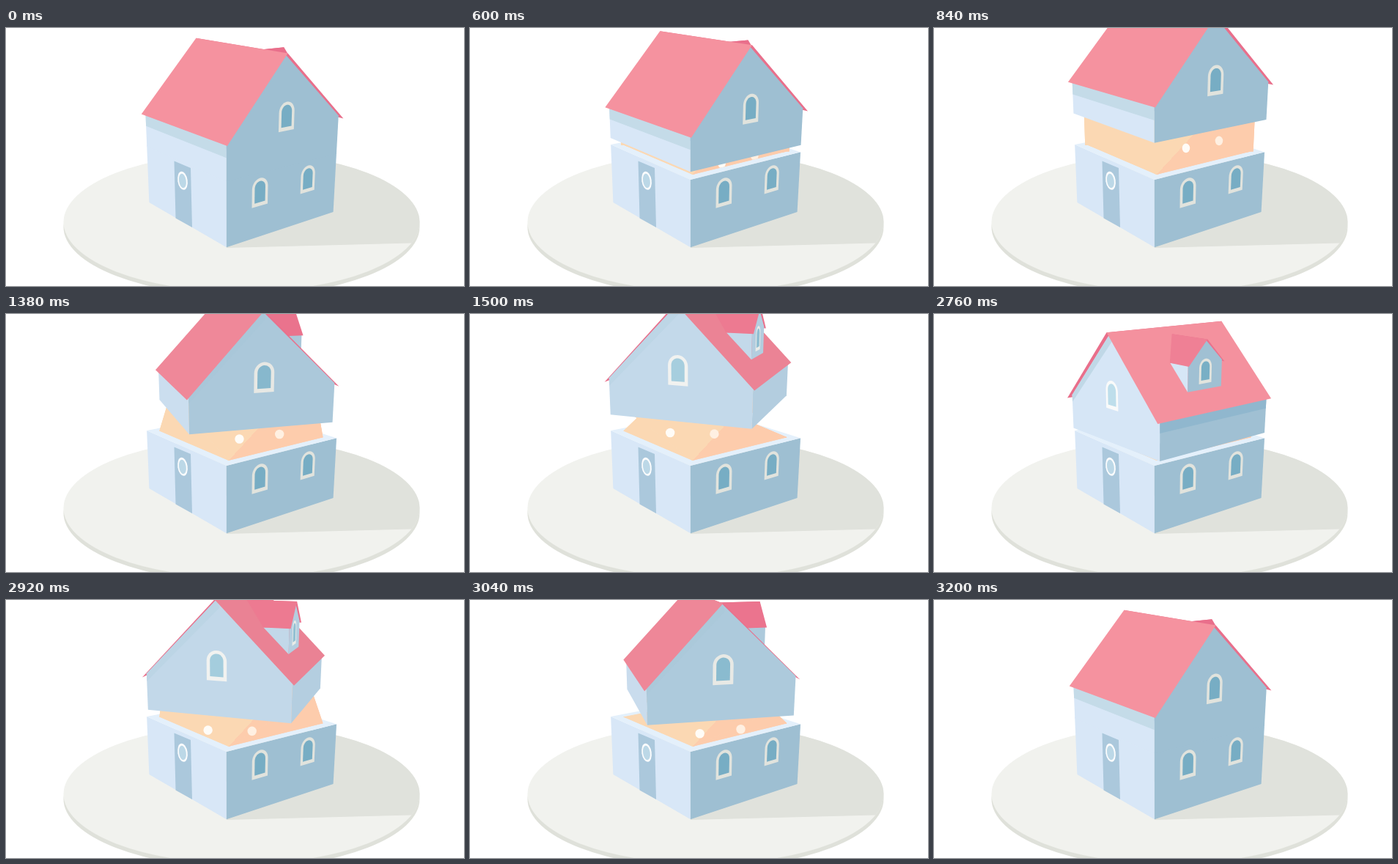
Animation of 625 by 352 pixels, one loop 4.2 s. Source, as an HTML page with a canvas:

```html
<!DOCTYPE html>
<html lang="en">
<head>
<meta charset="utf-8">
<title>Turning house</title>
<style>
  html, body { margin: 0; width: 100%; height: 100%; overflow: hidden; background: #fff; }
  canvas { display: block; width: 625px; height: 352px; }
</style>
</head>
<body>
<canvas id="stage" width="625" height="352"></canvas>
<script>
const ctx = document.getElementById('stage').getContext('2d');
const LOOP = 4200, STEP = 40, RAD = Math.PI / 180;

// Each hop of the upper storey: turn goes from -> to (degrees) while it lifts.
const HOPS = [
  { start: 600, steps: 11, height: .155, from: 0, to: 0, eye: .57, bulge: 7 },
  { start: 1300, steps: 10, height: .137, from: 0, to: 90, eye: .59, bulge: 1 },
  { start: 2760, steps: 12, height: .099, from: 90, to: 0, eye: .33, bulge: 1 }
];

// House measures: half side, cut height, ridge height, overhangs, wall thickness.
const K = .2837, CUT = .266, RIDGE = .697, EAVE_OUT = .01, GABLE_OUT = .018, INSET = .04;
const EAVE_A = .3976, EAVE_B = .41;

const LIGHT = [216, 231, 247], DARK = [158, 191, 210];
const PINK = [245, 146, 159], DUSK = [228, 120, 142], ROSE = [233, 111, 139];
const clamp = v => Math.max(0, Math.min(1, v));
const mix = (a, b, k) => `rgb(${a.map((v, i) => Math.round(v + (b[i] - v) * k))})`;
const alpha = turn => 37.13 - turn;

// Camera: a runs along the gable, b out of the gable, z up.
const CAM = { x: 303, y: 176, f: 840, s: Math.sin(17.3 * RAD), c: Math.cos(17.3 * RAD) };
function project(a, b, z, turn = 0, lift = 0) {
  const r = alpha(turn) * RAD, co = Math.cos(r), si = Math.sin(r);
  const side = .0492 + a * co + b * si;
  const fwd = 2.4806 + a * si - b * co;
  const drop = 1 - z - lift;
  const depth = fwd * CAM.c + drop * CAM.s;
  return [CAM.x + CAM.f * side / depth,
          CAM.y + CAM.f * (drop * CAM.c - fwd * CAM.s) / depth];
}

function trace(pts) {
  ctx.beginPath();
  pts.forEach(p => ctx.lineTo(p[0], p[1]));
  ctx.closePath();
}
function poly(pts, fill, opacity = 1) {
  trace(pts);
  ctx.globalAlpha = opacity;
  ctx.fillStyle = fill;
  ctx.fill();
  ctx.globalAlpha = 1;
}
function oval(x, y, rx, ry, fill, tilt = 0) {
  ctx.beginPath();
  ctx.ellipse(x, y, rx, ry, tilt, 0, 2 * Math.PI);
  ctx.fillStyle = fill;
  ctx.fill();
}
const facing = ([p, q, r]) =>
  (q[0] - p[0]) * (r[1] - p[1]) - (q[1] - p[1]) * (r[0] - p[0]) < 0;

// Brightness of a wall by the direction it looks in.
const lit = angle => clamp(Math.abs(1 - Math.abs(angle + 142.87) / 90));

function arch(place, half, base, top) {
  const pts = [place(-half, base), place(half, base)];
  for (let i = 0; i <= 16; i++) {
    const r = Math.PI * i / 16;
    pts.push(place(half * Math.cos(r), top - half + half * Math.sin(r)));
  }
  return pts;
}
function archWindow(place, size, light) {
  poly(arch(place, .039 * size, 0, .112 * size), mix([225, 227, 221], [250, 251, 251], light));
  poly(arch(place, .026 * size, .015 * size, .1 * size), mix([119, 173, 196], [192, 224, 236], light));
}

function drawGround() {
  oval(321.5, 271.5, 243, 94, '#dfe1da');
  oval(321.5, 265, 243, 95, '#f1f2ee');
  ctx.save();
  ctx.beginPath();
  ctx.ellipse(321.5, 265, 243, 95, 0, 0, 2 * Math.PI);
  ctx.clip();
  poly([[301, 300], [552, 293.5], [600, 293], [600, 150], [320, 150]], '#e0e2dc');
  ctx.restore();
}

function drawLower() {
  const A = [[-K, -K], [-K, K]], B = [[-K, K], [K, K]];
  const wall = ([p, q]) => [project(...p, 0), project(...q, 0), project(...q, CUT), project(...p, CUT)];
  poly(wall(A), mix(DARK, LIGHT, 1));
  poly(wall(B), mix(DARK, LIGHT, 0));
  poly([[229.5, 181.5], [252, 191], [254, 272], [231.5, 259.5]], '#abc8dc');
  oval(241, 208.3, 6.7, 12.6, '#fbfcfd', -.15);
  oval(240.9, 208.5, 4.8, 9.9, '#bcd8e7', -.15);
  for (const a of [-.125, .125])
    archWindow((u, v) => project(a + u, K, .127 + v), 1, 0);
}

function drawInside({ turn, from, lift, eye, bulge }) {
  const ring = (h, z, ...pose) =>
    [[-h, -h], [-h, h], [h, h], [h, -h]].map(([a, b]) => project(a, b, z, ...pose));
  const H = K - INSET;
  poly(ring(K, CUT), '#e4f0fb');

  // The body twists between the fixed opening and the turning storey.
  const low = ring(H, CUT), high = ring(H, CUT + .02, turn - from, lift);
  const [left, front, right] = low;
  ctx.save();
  trace([[150, 0], [150, left[1] + 3], left, front, right, [490, right[1] + 1], [490, 0]]);
  ctx.clip();
  const skin = ctx.createLinearGradient(front[0] - 49, front[1] - 45, front[0] + 49, front[1] + 45);
  skin.addColorStop(.5, '#fbd8b3');
  skin.addColorStop(.5, '#fdccac');
  ctx.strokeStyle = skin;
  ctx.lineWidth = bulge;
  ctx.lineJoin = 'round';
  low.forEach((p, i) => {
    const j = (i + 1) % 4;
    poly([p, low[j], high[j], high[i]], skin);
    ctx.stroke();
  });
  [[-.108, '#fffcf7'], [.06, '#fff0e2']].forEach(([a, white]) => {
    const [x, y] = project(a, K - .036, CUT + eye * lift, turn * .74);
    oval(x, y, bulge > 1 ? 5.3 : 6.2, 6.3, white);
  });
  ctx.restore();
}

function drawDormer(at, turn) {
  const mid = .006, out = .2235, tip = .2295, top = .67, low = .578;
  const slope = b => [at(.028, mid, top), at(.123, b, low), at(tip, b, low), at(tip, mid, top)];
  const face = [at(out, .097, .481), at(out, -.08, .481), at(out, -.08, .585),
                at(out, mid, .665), at(out, .097, .585)];
  const cheek = [at(.123, .097, low), at(out, .097, .481), at(out, .097, .585)];
  const r = alpha(turn);
  poly(slope(-.088), mix(ROSE, PINK, .05));
  if (facing(cheek)) poly(cheek, mix(DARK, LIGHT, lit(r - 90)));
  if (facing(face)) {
    poly(face, mix(DARK, LIGHT, lit(r)));
    archWindow((u, v) => at(out, .007 - u, .5036 + v), .84, lit(r));
  }
  poly(slope(.0985), mix(ROSE, PINK, .5 * turn / 90));
}

function drawUpper({ turn, lift }) {
  const at = (a, b, z) => project(a, b, z, turn, lift);
  const r = alpha(turn), E = K + EAVE_OUT, G = K + GABLE_OUT;
  const base = lift ? CUT : CUT - .008;
  const lean = clamp(1 - turn / 45), m = -.02 * lean, n = -.008 * lean;

  const roofA = [at(-E, -G, EAVE_A), at(-E, G, EAVE_A), at(m, G, RIDGE), at(n, -G, RIDGE)];
  const roofB = [at(E, G, EAVE_B), at(E, -G, EAVE_B), at(n, -G, RIDGE), at(m, G, RIDGE)];
  const seesA = facing(roofA), seesB = facing(roofB);
  if (!seesA) poly(roofA, mix(ROSE, PINK, 0));
  if (!seesB) {
    drawDormer(at, turn);
    poly(roofB, mix(ROSE, PINK, 0));
  }

  // Long walls; the shadow under the eaves fades while the storey turns.
  const shade = clamp(1 - Math.min(turn, 90 - turn) / 20);
  const long = (a, dir, z0, z1) =>
    [at(a, -dir * K, z0), at(a, dir * K, z0), at(a, dir * K, z1), at(a, -dir * K, z1)];
  const wallA = long(-K, 1, base, .41), wallB = long(K, -1, base, .42);
  if (facing(wallA)) {
    poly(wallA, mix(DARK, LIGHT, lit(r - 180)));
    poly(long(-K, 1, .348, .41), '#c4dbe8', shade);
  }
  if (facing(wallB)) {
    poly(wallB, mix(DARK, LIGHT, lit(r)));
    poly(long(K, -1, .37, .42), '#8eb6ce', shade);
  }

  // Gable, with the shadow of its left rake.
  const light = lit(r - 90);
  poly([at(-K, K, base), at(K, K, base), at(K, K, .42), at(m, K, .695), at(-K, K, .41)],
    mix(DARK, LIGHT, light));
  poly([at(-K, K, .41), at(m, K, .695), at(m + .012, K, .667), at(-K, K, .38)],
    mix(DARK, [190, 216, 230], light), Math.max(.4, shade));
  archWindow((u, v) => at(u, K, .402 + v), 1, light);

  if (seesA) poly(roofA, mix(PINK, DUSK, clamp(turn / 55)));
  if (seesB) {
    poly(roofB, mix(PINK, DUSK, clamp((90 - turn) / 55)));
    drawDormer(at, turn);
  }
}

function poseAt(t) {
  const pose = { turn: 0, from: 0, lift: 0, eye: 0, bulge: 1 };
  for (const hop of HOPS) {
    if (t < hop.start) break;
    const p = Math.min(1, (Math.floor((t - hop.start) / STEP) + 1) / hop.steps);
    const ease = .8 * (.5 - .5 * Math.cos(Math.PI * p)) + .2 * p;
    pose.turn = hop.from + (hop.to - hop.from) * ease;
    pose.from = hop.from;
    pose.lift = p < 1 ? hop.height * Math.sin(Math.PI * p) ** 1.3 : 0;
    pose.eye = hop.eye;
    pose.bulge = hop.bulge;
  }
  return pose;
}

function draw() {
  const pose = poseAt(performance.now() % LOOP);
  ctx.fillStyle = '#fff';
  ctx.fillRect(0, 0, 625, 352);
  drawGround();
  drawLower();
  if (pose.lift) drawInside(pose);
  drawUpper(pose);
  requestAnimationFrame(draw);
}
draw();
</script>
</body>
</html>
```
